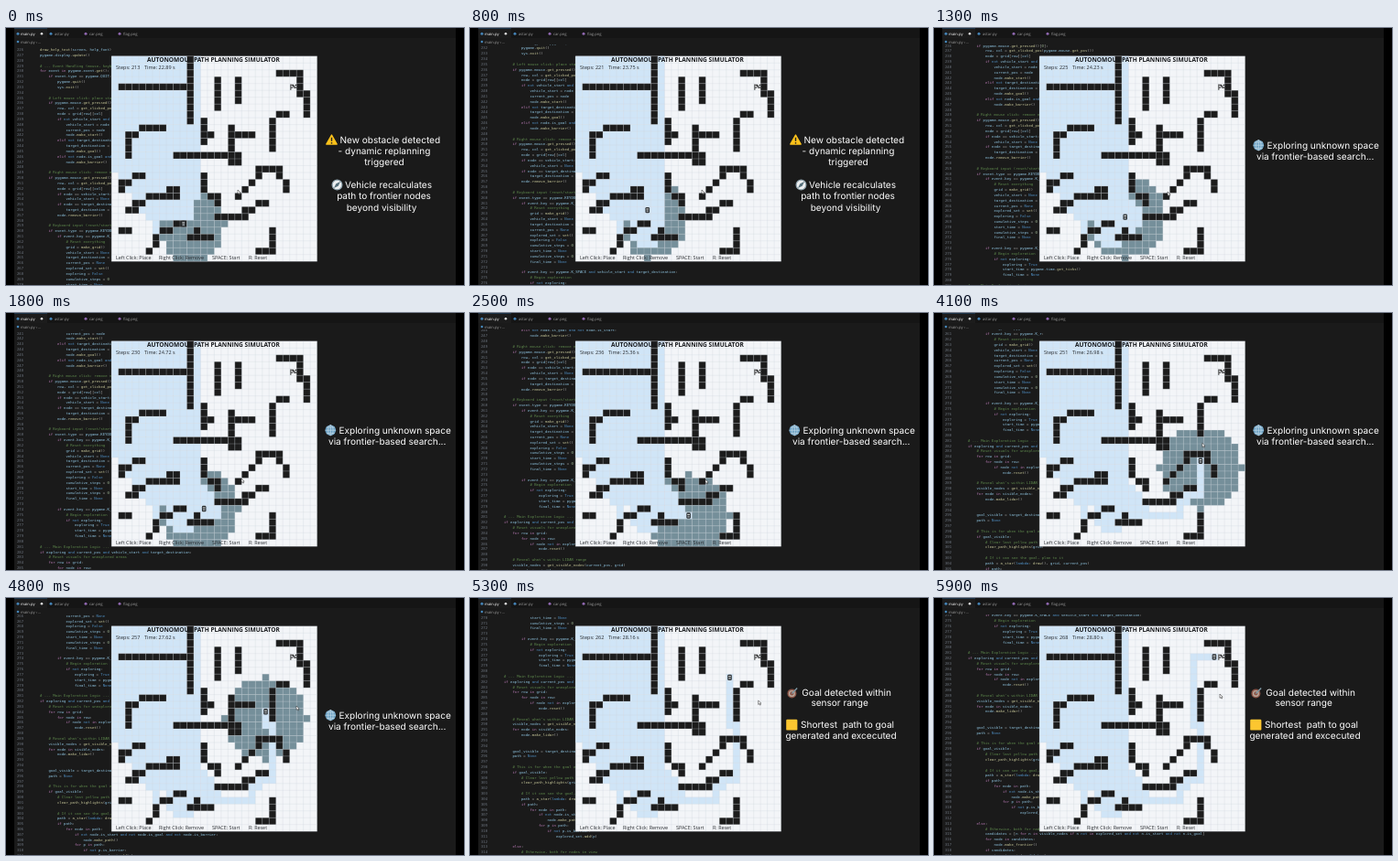
These frames come from a looping animation (500 px wide and 281 px high, 6 s). An HTML page with a canvas:

```html
<!DOCTYPE html>
<html lang="en">
<head>
<meta charset="utf-8">
<title>Path planning simulator</title>
<style>
  html, body { margin: 0; width: 100%; height: 100%; overflow: hidden; background: #000; }
  #stage { position: relative; width: 500px; height: 281px; overflow: hidden; }
  canvas, svg { position: absolute; left: 0; top: 0; display: block; }
  text { text-rendering: geometricPrecision; white-space: pre; }
  .tabs { font: 4.2px "Open Sans", sans-serif; fill: #9d9d9d; }
  .caption { font: 10.05px Inter, sans-serif; fill: #fff; visibility: hidden; }
  .caption .mid { text-anchor: middle; }
</style>
</head>
<body>
<div id="stage">
<canvas id="view" width="500" height="281"></canvas>
<svg width="500" height="281" viewBox="0 0 500 281">
  <g class="tabs">
    <rect x="9" width="482" height="11" fill="#151515"/>
    <rect x="9" width="36" height="11" fill="#1c1c1c"/>
    <rect x="9" width="36" height=".5" fill="#1d4a73"/>
    <circle cx="13" cy="6.2" r="1.5" fill="#4584b6"/>
    <circle cx="49" cy="6.2" r="1.5" fill="#4584b6"/>
    <circle cx="87" cy="6.2" r="1.5" fill="#9068b0"/>
    <circle cx="124" cy="6.2" r="1.5" fill="#9068b0"/>
    <circle cx="39" cy="6.2" r="1.3" fill="#e8e8e8"/>
    <text x="16" y="7.7" fill="#fff">main.py</text>
    <text x="53" y="7.7">astar.py</text>
    <text x="91" y="7.7">car.png</text>
    <text x="128" y="7.7">flag.png</text>
    <circle cx="13" cy="15" r="1.3" fill="#4584b6"/>
    <text x="16" y="16.5">main.py › ...</text>
  </g>

  <g class="caption">
    <path d="M355.5 117 L361.2 127 H349.8 Z" fill="#fcc21b" stroke="#fcc21b" stroke-width="1.4" stroke-linejoin="round"/>
    <path d="M355.5 119.8 V123.8 M355.5 125 V126.4" stroke="#222" stroke-width="1.4"/>
    <text x="364.5" y="125.7">New obstacle detected</text>
    <text class="mid" x="413" y="137.8">- dynamic replanning</text>
    <text class="mid" x="413" y="149.9">triggered</text>
    <circle cx="361.5" cy="171.5" r="5.4" fill="#eceff1" stroke="#90a4ae" stroke-width="1.2"/>
    <path d="M365 168 L362.7 172.7 L358 175 L360.3 170.3 Z" fill="#546e7a"/>
    <text x="370" y="174.5">Vehicle recalculates</text>
    <text class="mid" x="412.5" y="187.4">path to frontier nodes</text>
    <text class="mid" x="410" y="200.2">beyond visibility</text>
  </g>

  <g class="caption">
    <circle cx="354.3" cy="128.2" r="5.8" fill="#6a9fc2"/>
    <path d="M348.6 128.2 H360 M354.3 122.4 V134 M349.8 125 H358.8 M349.8 131.4 H358.8" stroke="#c4dbe8" stroke-width=".7" fill="none"/>
    <ellipse cx="354.3" cy="128.2" rx="2.8" ry="5.7" stroke="#c4dbe8" stroke-width=".7" fill="none"/>
    <text x="363.5" y="131.7">Exploring unknown space</text>
    <text class="mid" x="416.2" y="143.5">via frontier-based search...</text>
  </g>

  <g class="caption">
    <circle cx="351.4" cy="104.4" r="5" fill="#8c5648"/>
    <circle cx="351.4" cy="104.4" r="3.5" fill="#b9a89c"/>
    <circle cx="351.4" cy="104.4" r="2.1" fill="#8c5648"/>
    <path d="M351.4 104.4 L357.2 98.6" stroke="#7f9aa6" stroke-width="1.4"/>
    <text x="362.3" y="106.5">Goal detected within</text>
    <text class="mid" x="403.6" y="118.3">sensor range</text>
    <rect x="345.2" y="132.8" width="12.2" height="11.8" rx="1.2" fill="#fcc630"/>
    <text x="361" y="142.1">Shortest  path to goal</text>
    <text class="mid" x="405" y="153.6">generated and excecuted</text>
  </g>
</svg>
</div>

<script>
const ctx = document.getElementById('view').getContext('2d');
const captions = document.querySelectorAll('.caption');

const LOOP = 6000, TICK = 100;
const LEFT = 115.2, TOP = 30.8, CELL = 7.48, N = 30;
const LINE = 5.83, CHAR = 2.37, FIRST_LINE = 226, RANGE = 6;

// time, steps, clock, code scroll, pointer x, pointer y
const KEYS = [
  [0, 213, 22.89, 24, 253, 177], [800, 221, 23.75, -12.6, 253, 177],
  [1800, 230, 24.72, -65, 257, 181], [2500, 236, 25.36, -97.3, 257, 182],
  [3500, 246, 26.43, -153, 272, 163], [4800, 257, 27.62, -213.5, 317, 118],
  [5900, 268, 28.80, -260.5, 312, 105]
];

// step, column, row
const ROUTE = [
  [213, 10, 24], [215, 10, 25], [217, 10, 24], [221, 10, 22], [225, 12, 23],
  [229, 12, 24], [230, 13, 24], [232, 14, 25], [236, 16, 25], [240, 20, 25],
  [242, 20, 23], [243, 21, 23], [244, 21, 22], [246, 23, 22],
  [254, 23, 14], [255, 22, 14], [265, 22, 4], [268, 25, 4]
];

// each wall is a run of cells through these corners
const WALLS = [
  '11,0 11,9', '1,4 10,4', '15,3 15,7', '18,3 18,6',
  '24,2 27,2 27,5 28,5 28,8', '24,8 25,8', '23,9 23,13',
  '13,9 13,12', '14,11 14,11', '17,10 17,14', '18,11 20,11', '9,14 18,14 18,15 17,15',
  '4,10 7,10', '2,11 3,11', '2,12 2,14', '4,17 3,17 2,18 1,18 1,19',
  '5,20 9,20 9,19 8,19', '3,21 4,21', '2,22 3,22', '1,25 2,25',
  '9,24 10,24 7,25 8,25', '6,26 6,27 5,28', '12,25 12,26', '11,26 14,26',
  '13,17 13,19', '14,20 15,20 15,21', '22,16 21,16 21,17 20,18 19,19 18,20',
  '23,16 24,16 24,17 25,18 25,19',
  '22,21 21,21 20,22 19,22 19,23 15,23', '23,25 23,28 21,28'
];

const CODE = `draw_help_text(screen, help_font)
pygame.display.update()

# --- Event Handling (mouse, keyboard) ---
for event in pygame.event.get():
    if event.type == pygame.QUIT:
        pygame.quit()
        sys.exit()

    # Left mouse click: place start, goal, barrier
    if pygame.mouse.get_pressed()[0]:
        row, col = get_clicked_pos(pygame.mouse.get_pos())
        node = grid[row][col]
        if not vehicle_start and not node.is_goal:
            vehicle_start = node
            current_pos = node
            node.make_start()
        elif not target_destination and not node.is_start:
            target_destination = node
            node.make_goal()
        elif not node.is_goal and not node.is_start:
            node.make_barrier()

    # Right mouse click: remove node
    if pygame.mouse.get_pressed()[2]:
        row, col = get_clicked_pos(pygame.mouse.get_pos())
        node = grid[row][col]
        if node == vehicle_start:
            vehicle_start = None
        if node == target_destination:
            target_destination = None
        node.remove_barrier()

    # Keyboard input (reset/start)
    if event.type == pygame.KEYDOWN:
        if event.key == pygame.K_r:
            # Reset everything
            grid = make_grid()
            vehicle_start = None
            target_destination = None
            current_pos = None
            explored_set = set()
            exploring = False
            cumulative_steps = 0
            start_time = None
            cumulative_steps = 0
            final_time = None

        if event.key == pygame.K_SPACE and vehicle_start and target_destination:
            # Begin exploration
            if not exploring:
                exploring = True
                start_time = pygame.time.get_ticks()
                final_time = None

# --- Main Exploration Logic ---
if exploring and current_pos and vehicle_start and target_destination:
    # Reset visuals for unexplored areas
    for row in grid:
        for node in row:
            if node not in explored_set:
                node.reset()

    # Reveal what's within LIDAR range
    visible_nodes = get_visible_nodes(current_pos, grid)
    for node in visible_nodes:
        node.make_lidar()


    goal_visible = target_destination in visible_nodes
    path = None

    # This is for when the goal enters the LIDAR view
    if goal_visible:
        # Clear last yellow path (just in case)
        clear_path_highlights(grid)

        # If it can see the goal, plan to it
        path = a_star(lambda: draw(), grid, current_pos)
        if path:
            for node in path:
                if not node.is_start and not node.is_goal and not node.is_barrier:
                    node.make_path()
                for p in path:
                    if not p.is_barrier:
                        explored_set.add(p)

    else:
        # Otherwise, both for nodes in view
        candidates = [n for n in visible_nodes if n not in explored_set and not n.is_start and not n.is_goal]
        for node in candidates:
            node.make_frontier()
        if candidates:
            target = min(candidates)`.split('\n').map(tokens);

function colorOf(word, next) {
  if (word[0] === '#') return '#5f8a4d';
  if (/^(for|in|if|elif|else)$/.test(word)) return '#b87ab4';
  if (/^(and|not|None|True|False|lambda)$/.test(word)) return '#4f8fc4';
  if (/^\d/.test(word)) return '#a3bb97';
  if (/^\w/.test(word)) return next === '(' ? '#c8c89a' : '#8fc4e0';
  return '#b4b4b4';
}

function tokens(line) {
  return [...line.matchAll(/#.*|\w+|[^\s\w]+/g)].map(m => ({
    word: m[0], col: m.index, color: colorOf(m[0], line[m.index + m[0].length])
  }));
}

const id = (c, r) => r * N + c;
const walls = new Set();
for (const wall of WALLS) {
  const pts = wall.split(' ').map(p => p.split(',').map(Number));
  for (let i = 1; i < pts.length; i++) {
    const [c, r] = pts[i - 1], dc = pts[i][0] - c, dr = pts[i][1] - r;
    const len = Math.max(Math.abs(dc), Math.abs(dr), 1);
    for (let k = 0; k <= len; k++) walls.add(id(c + Math.round(dc * k / len), r + Math.round(dr * k / len)));
  }
}

function lerpKeys(keys, at) {
  if (at <= keys[0][0]) return keys[0];
  const i = keys.findIndex(k => k[0] >= at);
  if (i < 0) return keys[keys.length - 1];
  const a = keys[i - 1], b = keys[i], u = (at - a[0]) / (b[0] - a[0]);
  return a.map((v, j) => v + (b[j] - v) * u);
}

const carAt = step => lerpKeys(ROUTE, step).slice(1).map(Math.round);

function label(str, x, y, size, color, font = '"Open Sans", sans-serif', weight = 400) {
  const k = size / 40;
  ctx.save();
  ctx.translate(x, y);
  ctx.scale(k, k);
  ctx.font = `${weight} 40px ${font}`;
  ctx.fillStyle = color;
  ctx.fillText(str, 0, 0);
  ctx.restore();
}

function drawCode(scroll) {
  const mono = '"DejaVu Sans Mono", monospace';
  ctx.save();
  ctx.beginPath();
  ctx.rect(9, 18, 482, 263);
  ctx.clip();
  CODE.forEach((line, i) => {
    const y = scroll + i * LINE + 1.1;
    if (y < 14 || y > 286) return;
    label(String(FIRST_LINE + i), 12, y, 3.9, '#6e7681', mono);
    for (const t of line) label(t.word, 37 + t.col * CHAR, y, 3.94, t.color, mono);
  });
  ctx.restore();
}

// the lower left corner stays out of view
const hidden = (c, r) => c < (r - 16) * 0.65;

// cells already covered at a given step
function exploredAt(step) {
  const trail = [];
  for (let s = ROUTE[0][0]; s <= step; s++) trail.push([...carAt(s), s <= 230 && s > 213 ? 2.6 : 0.5]);
  return (c, r) => c <= 6 || (c <= 12 && r <= 23 && !(c === 12 && r > 20)) ||
    trail.some(([tc, tr, reach]) => Math.hypot(c - tc, r - tr) <= reach);
}

function drawGrid(step) {
  const explored = exploredAt(step), [lc, lr] = carAt(step - 1), scanning = step < 262;
  ctx.fillStyle = '#f3f5f8';
  ctx.fillRect(LEFT, TOP, CELL * N, CELL * N);
  for (let r = 0; r < N; r++) for (let c = 0; c < N; c++) {
    let fill = null;
    if (walls.has(id(c, r))) fill = '#1c1c1c';
    else if (hidden(c, r)) continue;
    else if (explored(c, r)) fill = '#d0e5f7';
    else if (scanning && Math.hypot(c - lc, r - lr) <= RANGE) fill = '#758f9a';
    if (!fill) continue;
    ctx.fillStyle = fill;
    ctx.fillRect(LEFT + c * CELL, TOP + r * CELL, CELL, CELL);
  }
  ctx.beginPath();
  for (let i = 0; i <= N; i++) {
    const d = i * CELL;
    ctx.moveTo(LEFT + d, TOP); ctx.lineTo(LEFT + d, TOP + CELL * N);
    ctx.moveTo(LEFT, TOP + d); ctx.lineTo(LEFT + CELL * N, TOP + d);
  }
  ctx.strokeStyle = 'rgba(200,207,216,.5)';
  ctx.lineWidth = 0.5;
  ctx.stroke();
}

function atCell(c, r, paint) {
  ctx.save();
  ctx.translate(LEFT + (c + 0.5) * CELL, TOP + (r + 0.5) * CELL);
  paint();
  ctx.restore();
}

function flag() {
  ctx.fillStyle = '#f3f5f8';
  ctx.fillRect(-3.5, -3.5, 7, 7);
  ctx.fillStyle = '#1c1c1c';
  ctx.fillRect(-3, -3, 0.9, 6.4);
  for (let i = 0; i < 8; i++) ctx.fillRect(-2 + (i % 4) * 1.4, -2.7 + ((i * 5 >> 2) % 3) * 1.4, 1.3, 1.3);
}

function car() {
  ctx.fillStyle = '#2c3033';
  ctx.beginPath();
  ctx.roundRect(-2.3, -3.2, 4.6, 6.4, 1.3);
  ctx.fill();
  ctx.fillStyle = '#d3d6d6';
  ctx.fillRect(-1.4, -1.7, 2.8, 1.1);
  ctx.fillStyle = '#8d9296';
  ctx.fillRect(-1.2, 0.2, 2.4, 1.9);
}

function drawPointer(x, y) {
  ctx.beginPath();
  [[0, 0], [0, 4.4], [1.1, 3.5], [1.9, 5.1], [2.6, 4.8], [1.9, 3.2], [3.2, 3.1]]
    .forEach(([dx, dy]) => ctx.lineTo(x + dx, y + dy));
  ctx.closePath();
  ctx.fillStyle = '#fff';
  ctx.fill();
  ctx.strokeStyle = '#222';
  ctx.lineWidth = 0.5;
  ctx.stroke();
}

function draw(time) {
  const [, steps, clock, scroll, px, py] = lerpKeys(KEYS, time);
  const step = Math.floor(steps + 1e-6);

  ctx.fillStyle = '#000';
  ctx.fillRect(0, 0, 500, 281);
  ctx.fillStyle = '#1a1a1a';
  ctx.fillRect(9, 0, 482, 281);
  drawCode(scroll);
  drawGrid(step);
  atCell(26, 4, flag);
  atCell(...carAt(step), car);

  const ink = '#25282c';
  label('AUTONOMOUS PATH PLANNING SIMULATOR', 154, 37.4, 6.6, '#17191c', undefined, 700);
  label(`Steps: ${step}`, 120, 45.4, 5.5, ink);
  label(`Time: ${clock.toFixed(2)} s`, 151, 45.4, 5.5, ink);
  label('Left Click: Place', 120, 253.2, 5.4, ink);
  label('Right Click: Remove', 167, 253.2, 5.4, ink);
  label('SPACE: Start', 225, 253.2, 5.4, ink);
  label('R: Reset', 265, 253.2, 5.4, ink);
  drawPointer(px, py);

  const shown = time < 1300 ? 0 : time < 5300 ? 1 : 2;
  captions.forEach((g, i) => g.style.visibility = i === shown ? 'visible' : 'hidden');
}

let last = -1;
function frame() {
  const time = Math.floor(performance.now() % LOOP / TICK) * TICK;
  if (time !== last) draw(last = time);
  requestAnimationFrame(frame);
}
frame();
</script>
</body>
</html>
```
